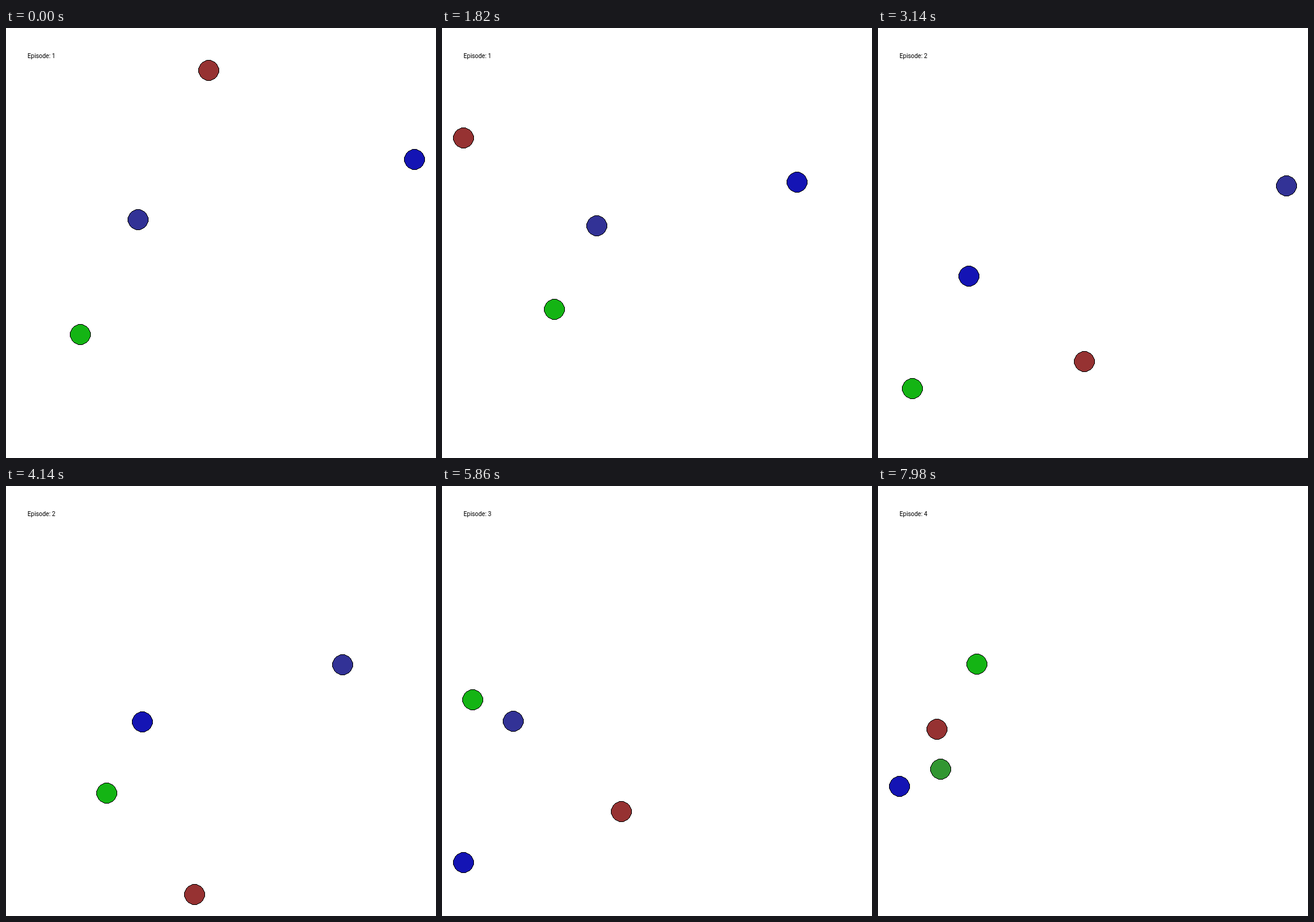
Write an HTML page that moves like this. It is 700 px wide and 700 px high and loops after 8 s.

```html
<!DOCTYPE html>
<html lang="en">
<head>
<meta charset="utf-8">
<title>Episodes</title>
<style>
  html, body { margin: 0; width: 100%; height: 100%; overflow: hidden; background: #fff; }
  svg { display: block; width: 100vw; height: 100vh; }
  path { shape-rendering: crispEdges; }
  text { font: 10px Roboto, "Liberation Sans", sans-serif; letter-spacing: -0.08px; }
</style>
</head>
<body>
<svg viewBox="0 0 700 700">
  <g id="dots"></g>
  <text id="label" x="35" y="49"></text>
</svg>
<script>
const LOOP = 8000, EPISODE = 2320, FIRST = 20, STEP = 100;
const MID = 350, REACH = 315, RADIUS = 17, DAMPING = 0.2;
const RED = '#963232', GREEN = '#14b414', BLUE = '#1414b4';
const DIM_GREEN = '#329632', DIM_BLUE = '#323296';

// Positions are relative to the centre. The red chaser starts at rest
// and each push [step, dx, dy] sends it on a damped glide.
const episodes = [
  {
    partner: [DIM_BLUE, -134.5, -37.5], green: [-228.45, 149.5], blue: [315, -135.5],
    chaser: [-19.5, -280.5], pushes: [[0, -467.3, -17], [7, 4.7, 88.8]]
  },
  {
    partner: [DIM_BLUE, 315, -92.5], green: [-293.5, 237.55], blue: [-201.5, 54.5],
    chaser: [67.8, -256], pushes: [[0, -151.4, 836.8], [9, 0, 169], [13, 0, -274.6]]
  },
  {
    partner: [DIM_BLUE, -233.5, 33.5], green: [-299.5, -1.5], blue: [-315, 263.5],
    chaser: [239.5, 107.4], pushes: [[0, -595.7, -28.7], [4, 259.5, 175]]
  },
  {
    partner: [DIM_GREEN, -247.5, 111.5], green: [-188.5, -59.5], blue: [-315, 139.5],
    chaser: [-152.5, 48.2], pushes: [[0, -214.6, 0], [4, 91.7, -4]]
  }
];

// Share of a push covered after n steps: from rest, damped to a stop.
function glide(n) {
  const u = DAMPING * Math.max(0, n);
  return 1 - (1 + u) * Math.exp(-u);
}

function chase({ chaser, pushes }, n) {
  return chaser.map((from, axis) =>
    pushes.reduce((sum, push) => sum + push[axis + 1] * glide(n - push[0]), from));
}

// Midpoint circle on whole pixels, as a filled disc and a thin outline.
function pixelCircle(radius) {
  const bar = (x, y, w) => `M${x} ${y}h${w}v1h${-w}z`;
  let disc = '', ring = '';
  let f = 1 - radius, y = radius;
  for (let x = 1; x <= y; x++) {
    if (f >= 0) f -= 2 * --y;
    f += 2 * x + 1;
    for (const [a, b] of [[x, y], [y, x]]) {
      for (const row of [b - 1, -b]) {
        disc += bar(-a, row, 2 * a);
        ring += bar(a - 1, row, 1) + bar(-a, row, 1);
      }
    }
  }
  return { disc, ring };
}

function add(parent, tag, attrs = {}) {
  const node = document.createElementNS('http://www.w3.org/2000/svg', tag);
  for (const name in attrs) node.setAttribute(name, attrs[name]);
  return parent.appendChild(node);
}

const label = document.getElementById('label');
const shape = pixelCircle(RADIUS);
const dots = Array.from({ length: 4 }, () => {
  const dot = add(document.getElementById('dots'), 'g');
  add(dot, 'path', { d: shape.disc });
  add(dot, 'path', { d: shape.ring, fill: '#000' });
  return dot;
});

function draw(time) {
  const t = time % LOOP;
  const index = Math.floor(t / EPISODE), local = t % EPISODE;
  const n = local < FIRST ? 0 : 1 + Math.floor((local - FIRST) / STEP);
  const scene = episodes[index];
  const items = [
    [RED, ...chase(scene, n)], scene.partner, [GREEN, ...scene.green], [BLUE, ...scene.blue]
  ];

  // The camera zooms out to keep the farthest dot in view.
  const zoom = REACH / Math.max(REACH, ...items.flatMap(([, x, y]) => [Math.abs(x), Math.abs(y)]));
  const pixel = v => Math.floor(MID + v * zoom + 1e-6);
  items.forEach(([color, x, y], i) => {
    dots[i].setAttribute('transform', `translate(${pixel(x)} ${pixel(y)})`);
    dots[i].firstChild.setAttribute('fill', color);
  });
  label.textContent = `Episode: ${index + 1}`;
}

const start = performance.now();
function tick() {
  draw(performance.now() - start);
  requestAnimationFrame(tick);
}
tick();
</script>
</body>
</html>
```
